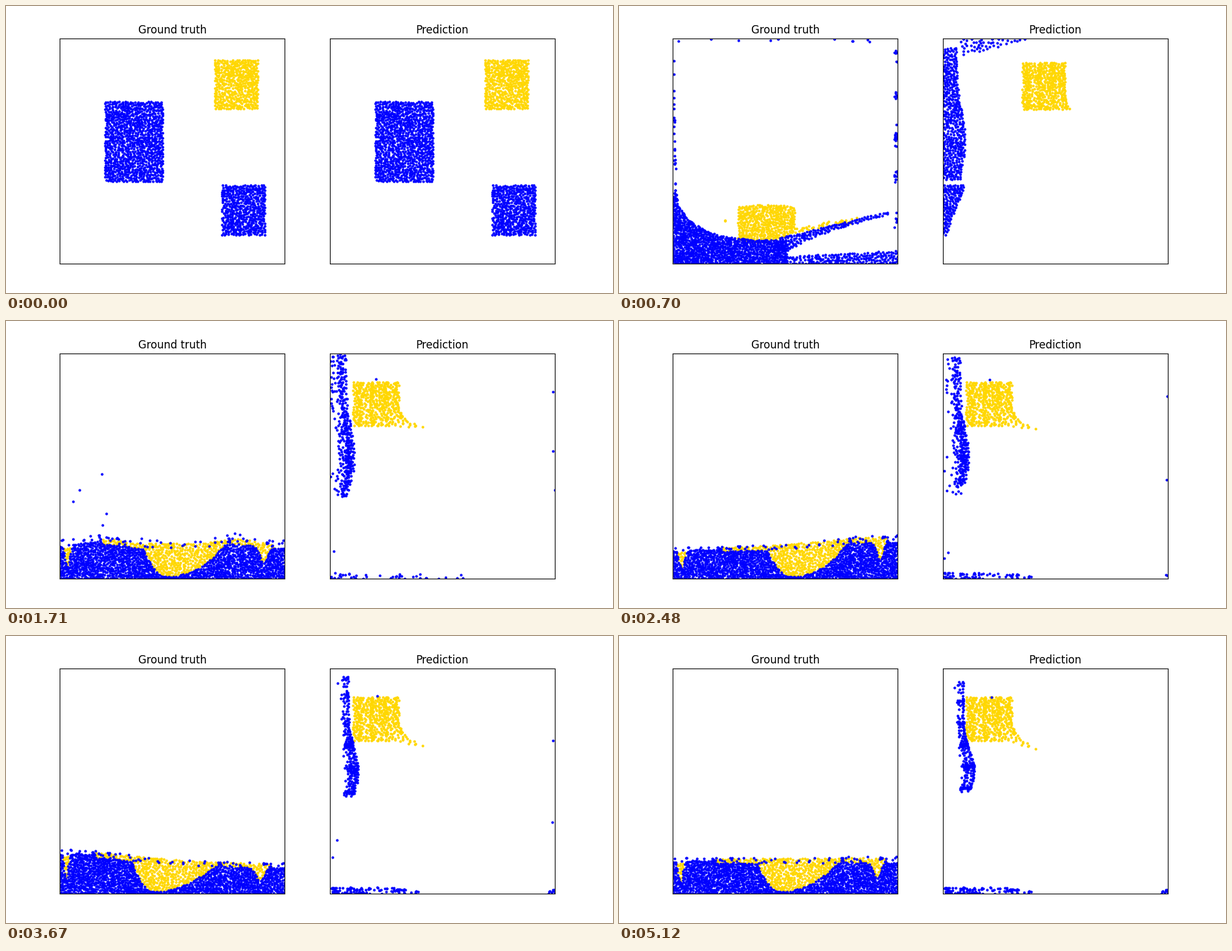
These frames come from a looping animation (950x450 px, 5150 ms). A matplotlib script:

```python
import numpy as np
import matplotlib.pyplot as plt
from matplotlib.animation import FuncAnimation

W, H, DPI = 950, 450, 100
LOOP, FRAMES = 5.15, 155
LEFT, RIGHT, TOP, FLOOR = 84.4, 436.4, 51.4, 404.4
SHIFT = 422.2                    # offset of the second panel
HIT, RESUME, SETTLE = 0.69, 0.77, 1.71
HALF_G = 465
N_BIG, N_SMALL, N_SAND, N_SKIN = 990, 471, 459, 75
N_WATER = N_BIG + N_SMALL
rng = np.random.default_rng(7)


def smooth(s):
    s = np.clip(s, 0, 1)
    return s * s * (3 - 2 * s)


def ease_out(s):
    return 1 - (1 - s) ** 2


def span(t, a, b):
    return float(np.clip((t - a) / (b - a), 0, 1))


def gauss(x, mid, width):
    return np.exp(-((x - mid) / width) ** 2)


def clump(u, period, amp, phase=0):
    return u - amp * np.sin(2 * np.pi * (u - phase) / period)


def scatter(n, a, b, lo, hi, upright=False, tries=10):
    """n evenly spaced points for a < u < b, lo(u) < v < hi(u)."""
    def bounds(u):
        return [f(u) if callable(f) else np.full_like(u, f) for f in (lo, hi)]

    grid = np.linspace(a, b, 400)
    low, high = bounds(grid)
    area = np.cumsum(np.maximum(high - low, 0))
    u = np.interp(rng.random(n * tries), area / area[-1], grid)
    low, high = bounds(u)
    pool = np.c_[u, low + (high - low) * rng.random(u.size)].reshape(n, tries, 2)
    pts = pool[:, 0].copy()
    for i in range(1, n):
        gap = ((pool[i][:, None] - pts[None, :i]) ** 2).sum(2).min(1)
        pts[i] = pool[i, gap.argmax()]
    return pts[:, ::-1] if upright else pts


def order(p):
    idx = np.argsort(p[:, 0])
    strips = np.array_split(idx, int(len(p) ** 0.5))
    return np.concatenate([s[np.argsort(p[s, 1])] for s in strips])


def match(src, dst):
    """Reorder dst so that neighbours in src stay neighbours."""
    out = np.empty_like(dst)
    out[order(src)] = dst[order(dst)]
    return out


# Starting blocks
big = scatter(N_BIG, 155, 245.5, 150, 275.5)
small = scatter(N_SMALL, 338, 405.5, 281, 359)
sand = scatter(N_SAND, 326.5, 394, 84.5, 161.5)


# ---- Ground truth: splash ----
def jet_top(x):
    return 366 - 0.24 * (x - 240)


def jet_base(x):
    return jet_top(x) + 3 + 23 * np.exp((255 - x) / 55)


film = rng.random(50) ** 3
splash = np.vstack([
    np.c_[86 + 5 * (1 - film) ** 2 * rng.random(50), 305 - 220 * film],
    np.c_[rng.uniform(431, 436, 42),
          75 + 65 * rng.integers(0, 5, 42) + rng.normal(0, 8, 42)],
    np.c_[rng.uniform(90, 410, 10), rng.uniform(52, 56, 10)],
    scatter(165, 245, 420, jet_top, jet_base),
    scatter(200, 255, 436, lambda x: 393 - 0.05 * (x - 255), 404)])
splash = np.vstack([splash, scatter(
    N_WATER - len(splash), 85, 262,
    lambda x: 368 - 68 * np.exp((85 - x) / 35), 404)])
splash = splash[np.argsort(splash[:, 0])]
water = np.vstack([match(big, splash[:N_BIG]), match(small, splash[N_BIG:])])

tail = rng.uniform(-0.25, 1, 46)
sand_splash = np.vstack([
    np.c_[np.where(tail < 0, 188, 276) + 98 * tail,
          352 - 18 * abs(tail) * np.where(tail < 0, 4, 1) + rng.normal(0, 2, 46)],
    scatter(N_SAND - 46, 186, 275, lambda x: 312 + 5 * ((x - 228) / 45) ** 4,
            lambda x: 371 - 14 * ((x - 218) / 50) ** 2)])
sand_splash = match(sand, sand_splash)


# ---- Ground truth: settled layer ----
def bed_top(x):
    """Top of the water: a bowl for the sand and two small pockets."""
    bowl = 1 - ((x - 252) / np.where(x < 252, 38, 90)) ** 2
    return (np.where(x < 150, 352, 356) + 45 * np.maximum(0, bowl)
            + 32 * gauss(x, 96, 5) + 24 * gauss(x, 403, 8))


skin_x = rng.uniform(86, 435, N_SKIN)
lift = rng.exponential(4, N_SKIN)
skin_x[:5] = rng.uniform(86, 160, 5)
lift[:5] = np.linspace(20, 105, 5)
skin = np.c_[skin_x, rng.uniform(347, 356, N_SKIN), lift]
bed = scatter(N_WATER - N_SKIN, 85, 436, bed_top, 404)
rest = match(water, np.vstack([skin, np.c_[bed, 0 * bed[:, 0]]]))

sand_rest = scatter(N_SAND, 90, 418,
                    lambda x: np.where(x < 150, 355, 349), bed_top)
sand_rest = match(sand_splash, np.c_[sand_rest, np.zeros(N_SAND)])


def fall(p, goal, vx, start, t):
    """Free fall that squashes on contact, then eases into the splash."""
    s = min(t, HIT)
    x = np.maximum(p[:, 0] + vx * s, 86.5 + 0.3 * (p[:, 0] - p[:, 0].min()))
    y = np.minimum(p[:, 1] + HALF_G * s * s,
                   402 - 0.35 * (p[:, 1].max() - p[:, 1]))
    w = smooth((t - start) / (HIT - start))
    return np.c_[x, y] * (1 - w) + goal * w


def slosh(t):
    if t < 2.3:
        return 19.5 * smooth(span(t, SETTLE, 2.3))
    if t < 3.95:
        return 19.5 - 42.5 * smooth(span(t, 2.3, 3.95))
    return -23 + 26 * smooth(span(t, 3.95, 5.3))


def settled(goal, t):
    """Standing wave that keeps the volume, plus dying chop and drops."""
    x, y, h = goal.T
    late = t - SETTLE
    d, width = slosh(t), RIGHT - LEFT
    a = np.pi * (x - LEFT) / width
    chop = 0.12 * np.exp(-late / 0.25) * np.maximum(0, np.cos((x - 150) * 0.03))
    depth = (FLOOR - y) * (1 + chop) / (1 + d * np.pi / width * np.cos(a))
    return np.c_[x + d * np.sin(a),
                 FLOOR - depth - np.maximum(0, h - HALF_G * late ** 2)]


def settle(p, goal, t):
    if t >= SETTLE:
        return settled(goal, t)
    w = smooth(span(t, RESUME, SETTLE))
    end = settled(goal, SETTLE)
    q = p + (end - p) * w
    drop = HALF_G * max(t - RESUME, 0) ** 2
    falls = end[:, 1] - p[:, 1] > 60
    q[falls, 1] = np.minimum(end[falls, 1], p[falls, 1] + drop)
    return q


def truth(t):
    if t < RESUME:
        blue = np.vstack([fall(big, water[:N_BIG], -165, 0.4, t),
                          fall(small, water[N_BIG:], -380, 0.24, t)])
        return fall(sand, sand_splash, -187, 0.5, t), blue
    return settle(sand_splash, sand_rest, t), settle(water, rest, t)


# ---- Prediction ----
p_big, p_small, p_sand = (p + [423, 0] for p in (big, small, sand))
by_x = np.argsort(p_big[:, 0])
core, lost = p_big[by_x[-430:]], p_big[by_x[:-430]]
lost = lost[np.argsort(lost[:, 1])]
spray, lost = lost[:48], lost[48:]
spray_top = match(spray, scatter(48, 535, 645, 52,
                                 lambda x: 78 - 0.24 * (x - 535)))


def bulge(y, base, size, width):
    return base + size * gauss(y, 212, width)


# Column along the left wall: c runs from its right edge (0) to the left (1)
rows = np.argsort(core[:, 1])
column = scatter(430, 66, 272, 508, lambda y: bulge(y, 528, 14, 65), upright=True)
column = column[np.argsort(column[:, 1])][np.argsort(rows)]
edge = bulge(column[:, 1], 528, 14, 65)
c = (edge - column[:, 0]) / (edge - 508)
v = (column[:, 1] - 66) / 206

thin_y = 53 + 222 * v + rng.normal(0, 1.5, 430)
thin = np.c_[bulge(thin_y, 534, 13, 60) - clump(c, 1, 0.1, 0.4) * 25, thin_y]
strand_y = clump(76 + 180 * v, 34, 4)
strand = np.c_[bulge(strand_y, 540, 18, 42)
               - clump(c, 0.5, 0.06, 0.12) * (16 + 8 * gauss(strand_y, 225, 45)),
               strand_y]
score = thin[:, 0] - 200 * (thin_y > 262) + rng.normal(0, 5, 430)
leaks = np.argsort(np.argsort(score)) < 160
leak_time = rng.uniform(0.9, 3.0, 430)

# Sand in block coordinates
su, sv = ((p_sand - p_sand.min(0)) / np.ptp(p_sand, axis=0)).T
corner = su ** 4 * sv ** 7
su_end = clump(su, 0.285, 0.022, 0.13) + rng.normal(0, 0.015, N_SAND)
sand_mid = np.c_[631 + 67 * clump(su, 0.285, 0.015, 0.13) + 9 * corner, 89 + 73 * sv]
sand_end = np.c_[543 + 71 * su_end + 45 * corner, 96 + 68 * sv + 4 * corner]

# Residue creeping along the floor, and passing flecks
floor_x = 510 + 118 * rng.random(100) ** 1.6
floor_y = 404 - 10 * rng.random(100) ** 1.3
floor_t = rng.uniform(1.5, 3.3, 100)
cu = np.sort(rng.random((12, 2)), axis=1)


def fleck_group(n, x, y, start, stay):
    start = rng.uniform(*start, n)
    return np.c_[rng.uniform(*x, n), rng.uniform(*y, n), start, start + stay]


flecks = np.vstack([
    fleck_group(10, (855, 859), (53, 360), (1.2, 4.2), 0.6),
    fleck_group(7, (508, 518), (280, 385), (1.2, 4.8), 0.5),
    fleck_group(14, (600, 720), (397, 404), (1.2, 1.6), 0.5),
    fleck_group(7, (605, 657), (399, 404), (1.6, 2.3), 9),
    np.c_[846 + 13 * cu[:, 1], 404 - 12 * cu[:, 0],
          np.linspace(2.1, 4.1, 12), np.full(12, 9)]])


def column_at(t):
    if t < RESUME:
        s = min(t / HIT, 1)
        return core + (column - core) * [s, s * s]
    p = column + (thin - column) * ease_out(span(t, RESUME, SETTLE))
    p += (strand - thin) * span(t, SETTLE, 5.12)
    p[leaks, 0] -= 260 * np.maximum(0, t - leak_time[leaks])
    return p


def prediction(t):
    s = min(t / HIT, 1)
    after, late = max(t - RESUME, 0), max(t - SETTLE, 0)
    move = min(t, HIT) + after
    lean = 30 * s * (p_small[:, 1] - 280) / 79
    seen = (flecks[:, 2] <= t) & (t < flecks[:, 3])
    parts = [column_at(t),
             lost - [190 * move, 0],
             p_small - np.c_[416 * move + lean, 0 * lean],
             spray + (spray_top - spray) * [s, s ** 3] - [0, 90 * after],
             np.c_[floor_x - 200 * np.maximum(0, floor_t - t), floor_y],
             flecks[seen, :2]]
    if t > 1.2:
        parts.append([[579 + 1.2 * late, 91 + 1.5 * late]])
    if t < RESUME:
        gold = p_sand + (sand_mid - p_sand) * s
    else:
        w = ease_out(span(t, RESUME, SETTLE))
        gold = sand_mid + (sand_end - sand_mid) * w
        gold[:, 1] += 3.5 * late * np.clip((gold[:, 0] - 612) / 44, 0, 1)
    return gold, np.vstack(parts)


# ---- Stage ----
fig = plt.figure(figsize=(W / DPI, H / DPI), dpi=DPI, facecolor="white")


def panel(x0, title):
    ax = fig.add_axes([x0 / W, 1 - FLOOR / H, (RIGHT - LEFT) / W, (FLOOR - TOP) / H])
    ax.set(xlim=(x0, x0 + RIGHT - LEFT), ylim=(FLOOR, TOP), xticks=[], yticks=[])
    ax.set_title(title, fontsize=12)
    return [ax.plot([], [], "o", ms=2, color=color)[0] for color in ("gold", "blue")]


panels = [(panel(LEFT, "Ground truth"), truth),
          (panel(LEFT + SHIFT, "Prediction"), prediction)]


def update(i):
    t = i * LOOP / FRAMES
    for lines, state in panels:
        for line, p in zip(lines, state(t)):
            line.set_data(p[:, 0], p[:, 1])
    return [line for lines, _ in panels for line in lines]


anim = FuncAnimation(fig, update, frames=FRAMES, interval=1000 * LOOP / FRAMES,
                     init_func=lambda: update(0), repeat=True, repeat_delay=0)
plt.show()
```
